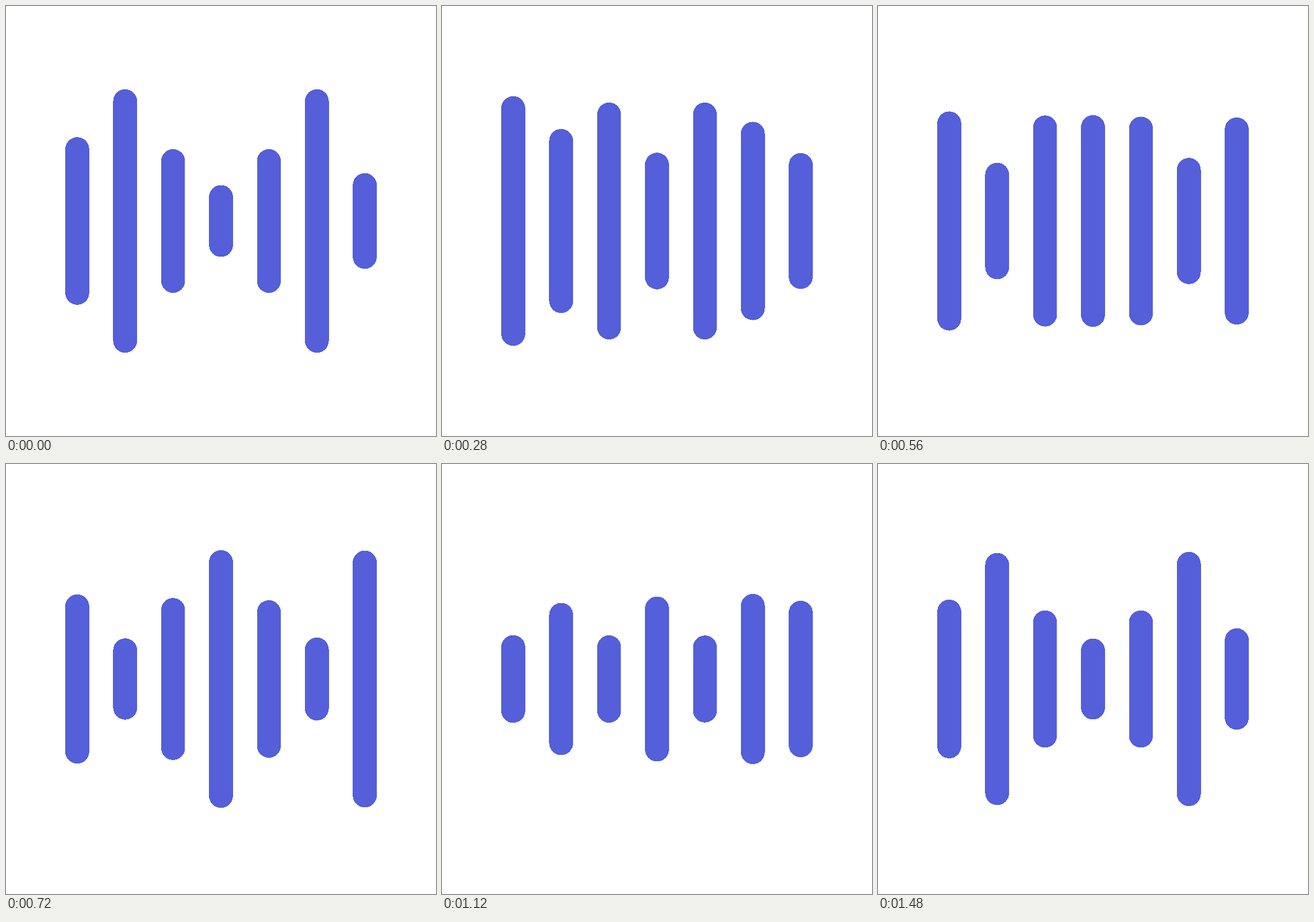
Recreate the animation shown at these times as an HTML page. Size 748 px wide and 748 px high, loop 1.52 s.

```html
<!DOCTYPE html>
<html lang="en">
<head>
<meta charset="utf-8">
<title>Sound bars</title>
<style>
  html, body { margin: 0; width: 100%; height: 100%; overflow: hidden; background: #fff; }
  svg { display: block; width: 100vw; height: 100vh; }
</style>
</head>
<body>
<svg id="stage" viewBox="0 0 748 748" fill="#545fd9" shape-rendering="crispEdges"></svg>
<script>
const LOOP = 1520, STEP = 40;
const KEYS = [0, 374, 752, 1144, LOOP];
const MID = 374, GAP = 83.36, UNIT = 125 / 6, WIDTH = 2 * UNIT;
const HIGH = 11.14, LOW = 3.1;

// Half heights in units at the key times; each loop closes on its first value.
// swing: to the opposite extreme and back the same way
const swing = (from, side) => [from, side, from > side ? LOW : HIGH, side];
// rise: up first, then down through the middle to a low point
const rise = (from, mid) => [from, 8.98 + 0.37 * from, mid, 3.47];

const bars = [
  rise(7, 6.65),
  swing(11, 6.57),
  rise(6, 6.35),
  swing(3, 6.61),
  rise(6, 6.15),
  swing(11, 7.37),
  swing(4, 6.24)
].map((keys, i) => {
  const rect = document.createElementNS("http://www.w3.org/2000/svg", "rect");
  rect.setAttribute("x", MID + (i - 3) * GAP - WIDTH / 2);
  rect.setAttribute("width", WIDTH);
  rect.setAttribute("rx", WIDTH / 2);
  document.getElementById("stage").appendChild(rect);
  return { keys, rect };
});

function draw(ms) {
  const t = Math.floor((ms % LOOP) / STEP) * STEP;
  let k = 0;
  while (t >= KEYS[k + 1]) k++;
  const u = (t - KEYS[k]) / (KEYS[k + 1] - KEYS[k]);
  for (const { keys, rect } of bars) {
    const a = keys[k], b = keys[(k + 1) % keys.length];
    const half = (a + (b - a) * u) * UNIT;
    rect.setAttribute("y", MID - half);
    rect.setAttribute("height", half * 2);
  }
}

let start;
function tick(now) {
  start ??= now;
  draw(Math.max(0, now - start));
  requestAnimationFrame(tick);
}
draw(0);
requestAnimationFrame(tick);
</script>
</body>
</html>
```
